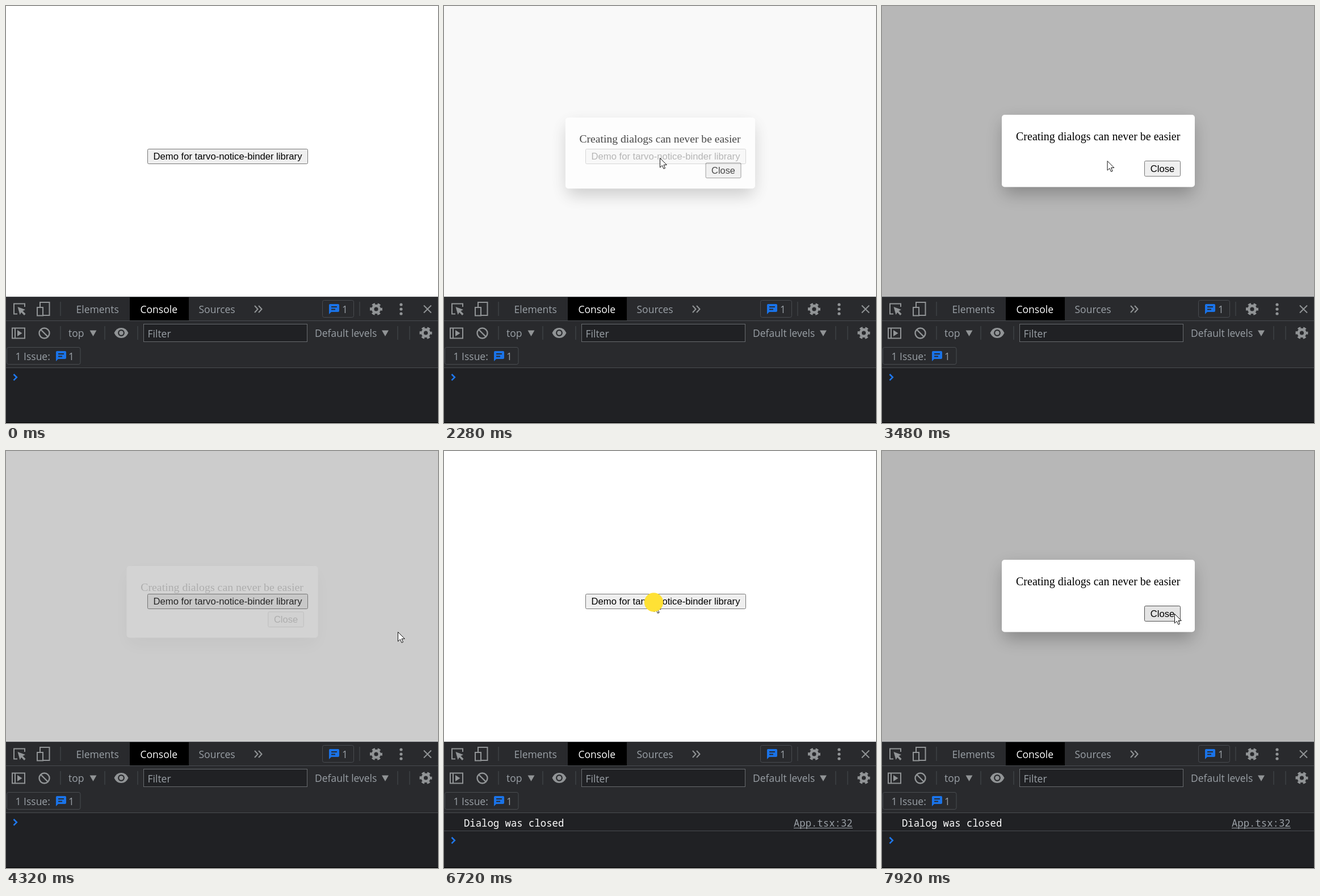
Recreate the animation shown at these times as an HTML page. Size 761 by 736 pixels, loop 8000 ms.

```html
<!DOCTYPE html>
<html lang="en">
<head>
<meta charset="utf-8">
<title>Dialog demo</title>
<style>
  html, body { margin: 0; width: 100%; height: 100%; overflow: hidden; background: #fff; }
  svg { display: block; }
  .btn rect { fill: #efefef; stroke: #767676; }
  .btn.hover rect { fill: #e4e4e4; stroke: #4f4f4f; }
  .btn text { font: 16.667px "Liberation Sans", Arial, sans-serif; }
  .serif { font: 20px "Liberation Serif", "Times New Roman", serif; }
  .ui { font: 17.5px "Open Sans", "Noto Sans", sans-serif; fill: #9aa0a6; }
  .mono { font: 17.3px "Noto Sans Mono", "DejaVu Sans Mono", monospace; fill: #fff; }
  .line { fill: none; stroke: #494c50; }
  .ico { fill: #919496; }
  .pen { fill: none; stroke: #919496; stroke-width: 2; }
</style>
</head>
<body>
<svg width="761" height="736" viewBox="0 0 761 736">
  <defs>
    <filter id="soft" x="-30%" y="-60%" width="160%" height="220%">
      <feGaussianBlur stdDeviation="15"/>
    </filter>
    <clipPath id="view"><path d="M0 0H761V513H0Z"/></clipPath>
    <g id="gear">
      <circle class="pen" r="5.9" style="stroke-width:4.6"/>
      <circle class="pen" r="9.3" style="stroke-width:3.4" stroke-dasharray="5.2 4.54" stroke-dashoffset="2.6"/>
    </g>
    <g id="chat">
      <path d="M2 0H16Q18 0 18 2V12Q18 14 16 14H4L0 18V2Q0 0 2 0Z" fill="#1a73e8"/>
      <path d="M4 5H14M4 9.5H11" stroke="#292a2d" stroke-width="1.8"/>
    </g>
    <path id="drop" class="ico" d="M0 0H12L6 10.5Z"/>
  </defs>

  <g clip-path="url(#view)">
    <path d="M0 0H761V513H0Z" fill="#fff"/>
    <g id="demo" class="btn">
      <rect x="249.5" y="252.5" width="282" height="26" rx="2"/>
      <text x="259.5" y="271">Demo for tarvo-notice-binder library</text>
    </g>
    <path id="shade" d="M0 0H761V513H0Z" opacity="0"/>
    <g id="dialog" opacity="0">
      <rect x="214" y="205" width="334" height="126" rx="8" opacity=".26" filter="url(#soft)"/>
      <rect x="211" y="192" width="340" height="127.5" rx="5" fill="#fff"/>
      <text class="serif" x="236" y="236.5">Creating dialogs can never be easier</text>
      <g id="close" class="btn">
        <rect x="462.5" y="273.5" width="63" height="27" rx="2"/>
        <text x="472.7" y="293">Close</text>
      </g>
    </g>
  </g>

  <g id="tools">
    <path d="M0 513H761V736H0Z" fill="#292a2d"/>
    <path d="M0 639H761V736H0Z" fill="#202124"/>
    <path d="M218 514H322V555H218Z"/>
    <path class="line" d="M0 513.5H761M0 555.5H761M0 638.5H761M96 522V547M623 522V547M96 565V589M174 565V589M232 565V589M690 565V589M711 565V589"/>
    <path d="M0 735H761V736H0Z"/>

    <path class="pen" d="M33 531V525.5H14V543.5H20"/>
    <path class="ico" d="M20.5 531L34 536 29.5 538.3 34.5 543.5 32 546 27 540.8 24.5 545Z"/>
    <path class="pen" d="M60 531V523H76.5V546H66M55 532H65V546.5H55Z"/>
    <text class="ui" x="123.5" y="542">Elements</text>
    <text class="ui" x="236.5" y="542" style="fill:#fff">Console</text>
    <text class="ui" x="339.5" y="542">Sources</text>
    <path class="pen" d="M438 529L443.5 535 438 541M445 529L450.5 535 445 541"/>
    <rect class="line" x="557.5" y="519.5" width="55" height="30" rx="3"/>
    <use href="#chat" x="569" y="526"/>
    <text class="ui" x="592" y="542">1</text>
    <use href="#gear" x="652" y="535"/>
    <g class="ico"><circle cx="696" cy="527" r="2.6"/><circle cx="696" cy="535" r="2.6"/><circle cx="696" cy="543" r="2.6"/></g>
    <path class="pen" d="M736 528.5L749 541.5M749 528.5L736 541.5"/>

    <path class="pen" d="M11 568.5H33V586.5H11ZM16 568V587"/>
    <path class="ico" d="M20 572L28.5 577.5 20 583Z"/>
    <circle class="pen" cx="67.5" cy="577.5" r="9" style="stroke-width:2.4"/>
    <path class="pen" d="M61 571L74 584" style="stroke-width:2.4"/>
    <text class="ui" x="110" y="584">top</text>
    <use href="#drop" x="147.5" y="572.5"/>
    <path class="ico" d="M190.5 577Q194.5 568 203 568T215.5 577Q211.5 586 203 586T190.5 577Z"/>
    <circle cx="203" cy="577" r="4.8" fill="#919496" stroke="#292a2d" stroke-width="2.2"/>
    <rect x="242.5" y="561.5" width="288" height="31" fill="#202124" stroke="#686b6f"/>
    <text class="ui" x="249.5" y="585">Filter</text>
    <text class="ui" x="544" y="584">Default levels</text>
    <use href="#drop" x="662" y="572.5"/>
    <use href="#gear" x="739.5" y="577"/>

    <rect class="line" x="1.5" y="602.5" width="129.5" height="30" rx="3"/>
    <text class="ui" x="16.5" y="625">1 Issue:</text>
    <use href="#chat" x="88" y="609"/>
    <text class="ui" x="110" y="625">1</text>

    <g id="log">
      <text class="mono" x="35" y="663">Dialog was closed</text>
      <text class="mono" x="616" y="663" style="fill:#9aa0a6">App.tsx:32</text>
      <path d="M616 665.5H720" stroke="#9aa0a6"/>
      <path class="line" d="M0 670.5H761"/>
    </g>
    <path id="prompt" d="M13.5 650L18.8 655.3 13.5 660.6" fill="none" stroke="#1f78f0" stroke-width="2.6"/>
  </g>

  <path id="arrow" d="M.5 .5V17L4.4 13.4 7 19.3 9.5 18.2 7.1 12.4H12.3Z" fill="#fff" stroke="#111"/>
  <circle id="tap" r="16.7" fill="#ffe135"/>
</svg>
<script>
const LOOP = 8000, SHADE = 0.282;
const $ = id => document.getElementById(id);
const [demo, shade, dialog, closeBtn, log, prompt_, arrow, tap] =
  ["demo", "shade", "dialog", "close", "log", "prompt", "arrow", "tap"].map($);

// Pointer path: time, x, y
const path = [
  [700, 623, 300], [880, 623, 290], [1160, 560, 205], [1340, 490, 181],
  [1560, 405, 245], [1790, 380, 268], [3380, 380, 268], [3480, 396, 273],
  [3700, 520, 292], [4000, 680, 318], [4100, 690, 319], [5250, 690, 319],
  [5500, 640, 302], [5950, 450, 262], [6200, 395, 246], [6500, 369.5, 267],
  [7300, 369.5, 267], [7420, 378, 268], [7660, 470, 281], [7850, 515, 287]
];
const taps = [[2120, 2260], [4130, 4280], [6680, 6820]];
const opens = [2200, 6760], shutAt = 4195, goneAt = 4500;

const clamp = v => Math.min(1, Math.max(0, v));
const easeOut = p => 1 - (1 - p) ** 3;
const easeInOut = p => p < 0.5 ? 4 * p ** 3 : 1 - 4 * (1 - p) ** 3;
const show = (el, on) => el.setAttribute("visibility", on ? "visible" : "hidden");
const inside = (p, x, y, w, h) => p[0] >= x && p[0] <= x + w && p[1] >= y && p[1] <= y + h;

function pointer(t) {
  const i = path.findIndex(k => k[0] > t);
  if (i < 0) return path[path.length - 1].slice(1);
  if (i === 0) return path[0].slice(1);
  const a = path[i - 1], b = path[i], p = (t - a[0]) / (b[0] - a[0]);
  return [a[1] + (b[1] - a[1]) * p, a[2] + (b[2] - a[2]) * p];
}

function dialogState(t) {
  const start = t >= opens[1] ? opens[1] : opens[0];
  if (t < start || (t >= goneAt && t < opens[1])) return { alpha: 0, dim: 0, y: 0, size: 1 };
  if (t >= shutAt && t < goneAt) {
    const p = easeOut(clamp((t - shutAt) / 265));
    const dim = 1 - easeInOut(clamp((t - shutAt) / 300));
    return { alpha: 1 - p, dim, y: 12.3 * p, size: 1 - 0.01 * p };
  }
  const p = easeOut(clamp((t - start) / 240));
  const dim = easeInOut(clamp((t - start) / 300));
  return { alpha: p, dim, y: 13 * (1 - p), size: 0.941 + 0.059 * p };
}

function draw() {
  const t = performance.now() % LOOP;
  const pos = pointer(t), d = dialogState(t);
  const tapping = taps.some(([a, b]) => t >= a && t < b);
  const logged = t >= goneAt;

  shade.setAttribute("opacity", d.dim * SHADE);
  dialog.setAttribute("opacity", d.alpha);
  dialog.setAttribute("transform",
    `translate(381 ${255.5 + d.y}) scale(${d.size}) translate(-381 -255.5)`);
  demo.classList.toggle("hover",
    t > path[0][0] && !d.alpha && !tapping && inside(pos, 249, 252, 283, 27));
  closeBtn.classList.toggle("hover", d.alpha === 1 && inside(pos, 462, 273, 64, 28));

  show(log, logged);
  prompt_.setAttribute("transform", `translate(0 ${logged ? 32 : 0})`);
  show(arrow, t >= path[0][0]);
  arrow.setAttribute("transform", `translate(${pos})`);
  show(tap, tapping);
  tap.setAttribute("transform", `translate(${pos})`);
  requestAnimationFrame(draw);
}
draw();
</script>
</body>
</html>
```
